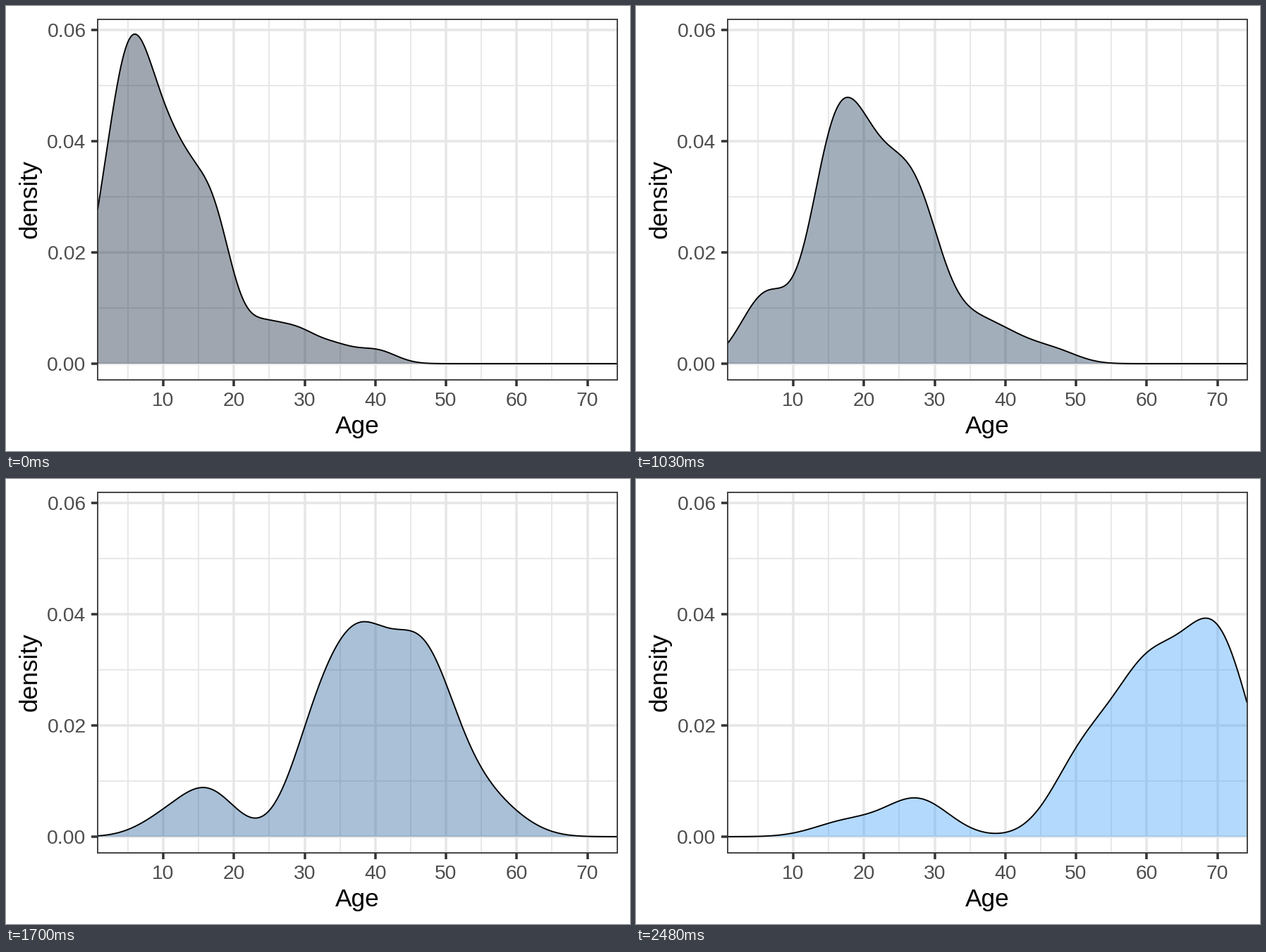
A matplotlib script for the animation above (2.5 s loop, 885x632 px).

```python
import numpy as np
import matplotlib.pyplot as plt
from matplotlib.animation import FuncAnimation
from matplotlib.patches import Polygon, Rectangle

W, H, DPI = 885, 632, 100
TICK_MS, LOOP_MS = 10, 2500
LEFT, RIGHT, TOP, BOTTOM = 130, 866.5, 18.5, 530.5
GRID, DARK = "#e6e6e6", "#333333"

plt.rcParams["font.family"] = "Liberation Sans"

# Moments at which the picture advances by one step.
CHANGES = np.concatenate([np.arange(730, 1031, 100),
                          np.arange(1100, 2001, 100),
                          np.arange(2080, 2481, 100)])

# Age groups: weight, mean age at the start, mean age at the end.
GROUPS = np.array([
    (0.030, 0.6, 17.5), (0.076, 1.3, 27.5),
    (0.155, 4.7, 51.2), (0.145, 5.6, 58.5),
    (0.176, 9.0, 61.5), (0.155, 12.8, 68.0), (0.157, 17.2, 70.3),
    (0.042, 24.0, 71.0), (0.035, 29.0, 72.5),
    (0.020, 34.3, 73.0), (0.016, 40.2, 74.0),
])
FILL_START = np.array([17, 33, 55]) / 255
FILL_END = np.array([66, 160, 248]) / 255


def px(age):
    return 122.75 + 10.025 * age


def py(density):
    return 508 - 7900 * density


def pt(pixels):
    return pixels * 72 / DPI


def density(age, progress):
    weight, start, end = GROUPS.T
    mean = start + (end - start) * progress
    width = 2.75 + 2.3 * progress - 0.55 * progress ** 2
    z = (age[:, None] - mean) / width
    return np.exp(-z ** 2 / 2) @ weight / (width * np.sqrt(2 * np.pi))


fig = plt.figure(figsize=(W / DPI, H / DPI), dpi=DPI, facecolor="white")
ax = fig.add_axes([0, 0, 1, 1])
ax.set_xlim(0, W)
ax.set_ylim(H, 0)
ax.axis("off")


def line(xs, ys, width, color, z):
    return ax.plot(xs, ys, color=color, lw=pt(width), zorder=z,
                   solid_capstyle="butt")[0]


def label(x, y, text, size, color, **kw):
    ax.text(x, y, text, fontsize=pt(size), color=color, va="baseline", **kw)


for age in range(5, 71, 5):
    major = age % 10 == 0
    x = px(age)
    line([x, x], [TOP, BOTTOM], 3.5 if major else 1.8, GRID, 2 if major else 1)
    if major:
        line([x, x], [BOTTOM, 540], 3.5, DARK, 5)
        label(x, 568, str(age), 28.3, "#4d4d4d", ha="center")

for i in range(7):
    major = i % 2 == 0
    y = py(i / 100)
    line([LEFT, RIGHT], [y, y], 3.5 if major else 1.8, GRID, 2 if major else 1)
    if major:
        line([120.5, LEFT], [y, y], 3.5, DARK, 5)
        label(113.5, y + 10, f"{i / 100:.2f}", 28.3, "#4d4d4d", ha="right")

label((LEFT + RIGHT) / 2, 607.5, "Age", 35.2, "black", ha="center")
label(43, (TOP + BOTTOM) / 2, "density", 35.2, "black", ha="right",
      rotation=90, rotation_mode="anchor") if False else ax.text(
    43, (TOP + BOTTOM) / 2, "density", fontsize=pt(35.2), color="black",
    ha="center", va="baseline", rotation=90, rotation_mode="anchor")

ax.add_patch(Rectangle((LEFT, TOP), RIGHT - LEFT, BOTTOM - TOP, fill=False,
                       ec=DARK, lw=pt(1.8), zorder=6))

ages = np.linspace(0.72, 74.2, 400)
xs = px(ages)
area = Polygon([(0, 0), (1, 1)], lw=0, alpha=0.4, zorder=3)
ax.add_patch(area)
curve = line([], [], 1.9, "black", 4)


def update(frame):
    step = np.searchsorted(CHANGES, frame * TICK_MS, side="right")
    progress = step / len(CHANGES)
    ys = py(density(ages, progress))
    curve.set_data(xs, ys)
    area.set_xy(np.column_stack([np.r_[xs[0], xs, xs[-1]],
                                 np.r_[py(0), ys, py(0)]]))
    area.set_facecolor(FILL_START + (FILL_END - FILL_START) * progress ** 1.2)
    return area, curve


anim = FuncAnimation(fig, update, frames=LOOP_MS // TICK_MS,
                     interval=TICK_MS, repeat=True, repeat_delay=0)
plt.show()
```
